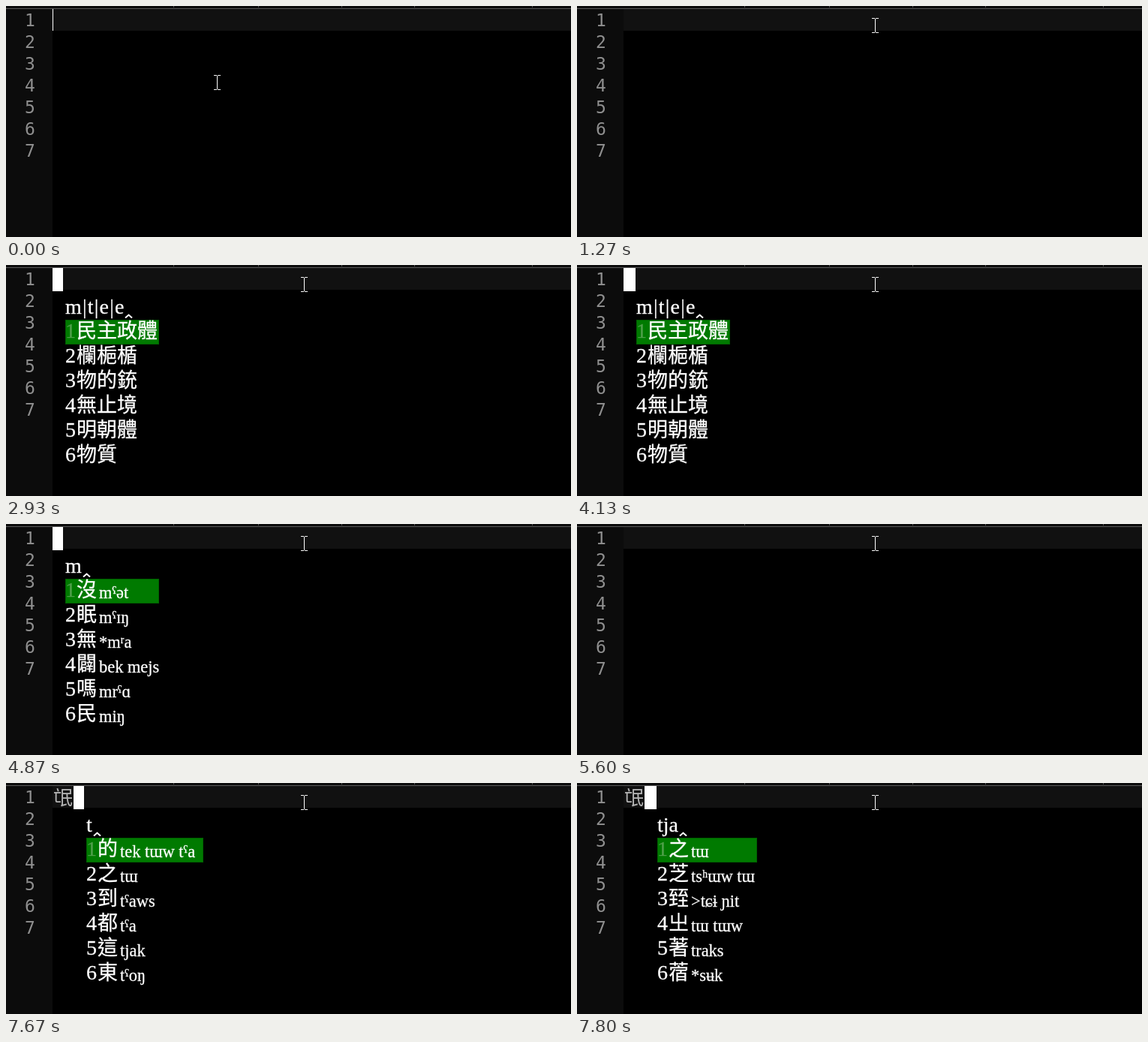
Write an HTML page that moves like this. It is 753 px wide and 308 px high and loops after 8 s.

```html
<!DOCTYPE html>
<html lang="zh-Hant">
<head>
<meta charset="utf-8">
<title>Phonetic input</title>
<style>
  html, body { margin: 0; width: 100%; height: 100%; overflow: hidden; background: #000; }
  body { position: relative; }
  div, #mouse { position: absolute; }
  #gutter { left: 0; top: 0; width: 62px; height: 100%; background: #0c0c0c; }
  #gutter span {
    position: absolute; left: 18px; width: 28px; text-align: center; color: #8f8f8f;
    font: 23px/29px "DejaVu Sans Mono", monospace;
  }
  #line { left: 62px; top: 4px; right: 0; height: 29px; background: #111; }
  #top { left: 0; top: 0; width: 100%; height: 3px; background: #0c0c0c; border-bottom: 1px solid #5a5a5a; }
  #top i { position: absolute; top: 0; width: 1px; height: 2px; background: #555; }
  #typed, .han { font-family: "Noto Sans CJK TC", "Noto Sans CJK JP", "Noto Sans CJK", sans-serif; }
  #typed { left: 63px; top: 3px; color: #b4b4b4; font-size: 26px; font-weight: 300; line-height: 29px; }
  #bar { top: 4px; background: #fff; }
  #menu {
    top: 39px; color: #fff; white-space: pre; font: 28px/33px "Liberation Serif", serif;
    -webkit-text-stroke: .3px;
  }
  #menu p { position: relative; margin: 0; height: 33px; }
  #menu p + p { top: -1px; }
  #pick { left: 0; top: 34px; height: 33px; box-sizing: border-box; background: #007a00; border: 1px solid #006000; }
  #menu p:nth-of-type(2) { color: #4fa04a; }
  #menu b { margin: 0 1.2px; font-weight: 400; }
  .han, .note { color: #fff; line-height: 0; }
  .han { font-size: 27px; margin-left: 1px; }
  .note { position: relative; top: 2px; font-size: 22.4px; margin-left: 3px; }
  #menu svg { margin-left: 1px; vertical-align: -6px; }
  svg { fill: none; stroke: #fff; }
</style>
</head>
<body>
<div id="gutter"></div>
<div id="line"></div>
<div id="top"></div>
<div id="typed">氓</div>
<div id="bar"></div>
<div id="menu"></div>
<svg id="mouse" width="9" height="20"><path d="M0 .5H4M5 .5H9M4.5 1V19M0 19.5H4M5 19.5H9" shape-rendering="crispEdges"/></svg>
<script>
const LOOP = 8000, TICK = 66.6;
const COMMIT = 7070;
const $ = id => document.getElementById(id);

// keys typed: [text, highlight width, candidates]
const menus = {
  m: ['m', 125, '沒mˤət/眠mˤɪŋ/無*mʳa/闢bek mejs/嗎mrˤɑ/民miŋ'],
  mt: ['m|t', 87, '物質/們的/網站/面對/目的/面的'],
  mte: ['m|t|e', 106, '物的銃/無止境/明朝體/物質/們的/目的'],
  mtee: ['m|t|e|e', 125, '民主政體/欄梔楯/物的銃/無止境/明朝體/物質'],
  mi: ['mi', 97, '民miŋ/眠mˤɪŋ/名*meŋ/明mraŋ/面mens/米mˤiʔ'],
  mis: ['mis', 96, '氓mrˤɪŋ/珹*deŋ/动tʊŋ⁵¹'],
  t: ['t', 156, '的tek tɯw tˤa/之tɯ/到tˤaws/都tˤa/這tjak/東tˤoŋ'],
  tj: ['tj', 133, '之tɯ/者tjaʔ/知tre/正teŋs/中truŋ/主toʔ'],
  tja: ['tja', 133, '之tɯ/芝tsʰɯw tɯ/臸&gt;tɕɨ ɲit/㞢tɯ tɯw/著traks/蓿*sʉk']
};

// [time, keys pending]
const keys = [
  [0, ''], [1870, 'm'], [2400, 'mt'], [2730, 'mte'], [2930, 'mtee'], [4530, 'mte'],
  [4670, 'mt'], [4870, 'm'], [5000, ''], [6530, 'mi'], [6600, 'mis'], [COMMIT, ''],
  [7670, 't'], [7730, 'tj'], [7800, 'tja']
];

// [time, time the caret starts to blink]
const blinks = [[0, 670], [1870, 1998], [5000, 5000], [6530, 6600], [COMMIT, COMMIT], [7670, 7730]];

const at = (list, t) => list.findLast(step => step[0] <= t)[1];
const lit = (t, from, half) => Math.floor((t - from) / half) % 2 === 0;
const ease = (t, from, to) => {
  const p = Math.min(1, Math.max(0, (t - from) / (to - from)));
  return p * p * (3 - 2 * p);
};

function menuHtml([text, width, items]) {
  const rows = items.split('/').map((item, i) => {
    const [, han, note] = item.match(/^([\u3400-\u9fff]+)(.*)$/);
    return `<p>${i + 1}<span class="han">${han}</span>` +
      (note && `<span class="note">${note}</span>`) + '</p>';
  });
  return `<div id="pick" style="width:${width}px"></div>` +
    `<p>${text.replaceAll('|', '<b>|</b>')}<svg width="11" height="6">` +
    '<path d="M1 5.5L5.5 1.5L10 5.5" stroke-width="2"/></svg></p>' + rows.join('');
}

function place(id, left, top) {
  $(id).style.left = Math.round(left) + 'px';
  $(id).style.top = Math.round(top) + 'px';
}

for (let i = 0; i < 7; i++)
  $('gutter').innerHTML += `<span style="top:${5 + 29 * i}px">${i + 1}</span>`;
for (const x of [223, 336, 447, 544, 701])
  $('top').innerHTML += `<i style="left:${x}px"></i>`;

let shown;
function draw(t) {
  const key = at(keys, t), from = at(blinks, t);
  const done = t >= COMMIT;
  if (key !== shown) {
    $('menu').innerHTML = key ? menuHtml(menus[key]) : '';
    shown = key;
  }
  place('menu', done ? 107 : 79, 39);
  $('typed').style.visibility = done ? 'visible' : 'hidden';

  // a block with a blinking edge while composing, else a thin blinking line
  const width = key ? 14 + 2 * lit(t, from, 532) : +lit(t, from, 600);
  place('bar', done ? (key ? 90 : 89) : 62, 4);
  $('bar').style.width = width + 'px';
  $('bar').style.height = (key ? 31 : 29) + 'px';

  // the pointer glides in two strokes, sampled in steps
  const s = Math.floor(t / TICK) * TICK;
  const a = ease(s, 0, 5 * TICK), b = ease(s, 6 * TICK, 8 * TICK);
  place('mouse', 277 + 91 * a + 25 * b, 92 - 63 * a - 13 * b);
}

const start = performance.now();
function tick() {
  draw((performance.now() - start) % LOOP);
  requestAnimationFrame(tick);
}
tick();
</script>
</body>
</html>
```
